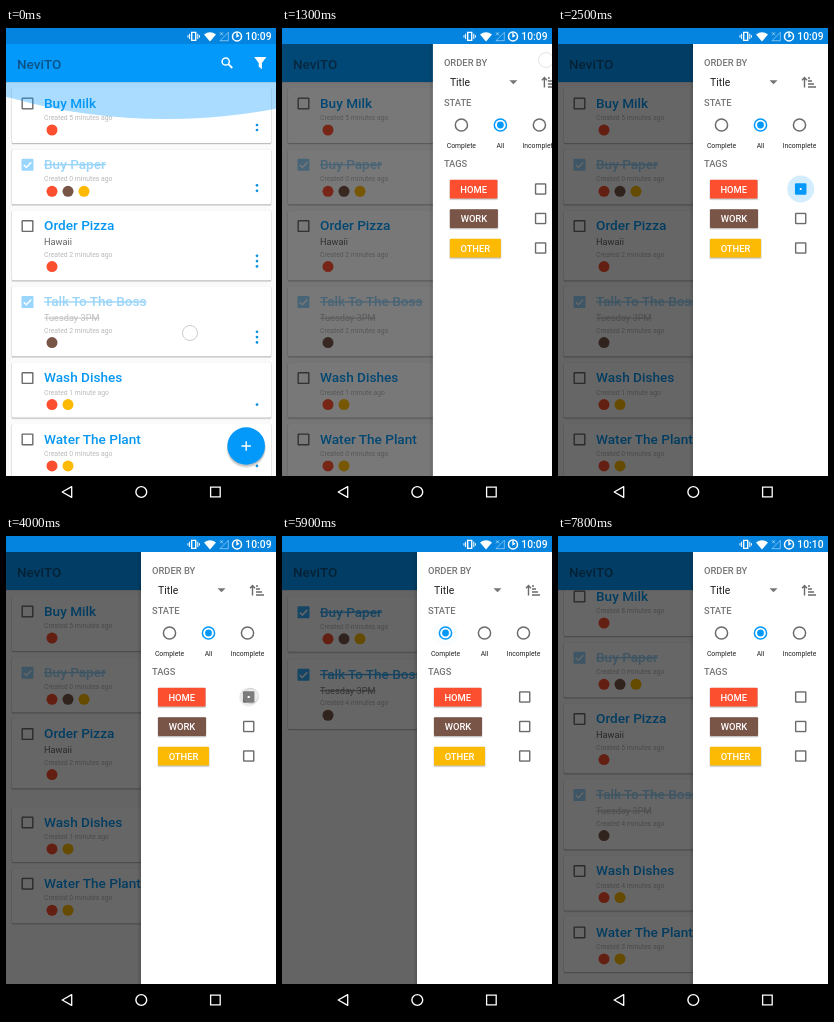
An HTML page that plays this animation: 270 px wide and 480 px high, repeating every 8 s.

```html
<!DOCTYPE html>
<html lang="en">
<head>
<meta charset="utf-8">
<title>To-do list with filter drawer</title>
<style>
html, body { margin: 0; width: 100%; height: 100%; overflow: hidden; background: #000; }
svg { display: block; width: 100vw; height: 100vh; font-family: Roboto, sans-serif; }
.m { font-weight: 500; }
.title { font-size: 13.6px; font-weight: 500; fill: #0597f2; }
.note { font-size: 9.2px; fill: #616161; }
.date { font-size: 6.8px; fill: #b9b9b9; }
.head { font-size: 9.4px; font-weight: 500; fill: #757575; }
.tag { font-size: 9.4px; font-weight: 500; fill: #fff; text-anchor: middle; }
.lab { font-size: 6.8px; fill: #212121; text-anchor: middle; }
</style>
</head>
<body>
<svg id="stage" viewBox="0 0 270 480" preserveAspectRatio="none"></svg>
<script>
const LOOP = 8000;
const BAR = 16, TOP = 54, FLOOR = 448;
const BLUE = '#0399fb', GREY = '#6b6b6b';
const TAG = { r: '#fb4f2f', b: '#795548', y: '#fdba04' };
const stage = document.getElementById('stage');

const clamp = v => Math.max(0, Math.min(1, v));
const span = (t, a, b) => clamp((t - a) / (b - a));
const ease = u => (1 - Math.cos(Math.PI * u)) / 2;

// eased value through [time, value] keys
function track(t, keys) {
  let v = keys[0][1];
  for (let i = 1; i < keys.length; i++) {
    const [a, from] = keys[i - 1], [b, to] = keys[i];
    if (t >= a) v = from + (to - from) * ease(span(t, a, b));
  }
  return v;
}

// held value: the last [time, value] already reached
const step = (t, keys) => keys.reduce((v, k) => t >= k[0] ? k[1] : v, keys[0][1]);

const cards = [
  { title: 'Buy Milk', tags: 'r', menu: [37, 42], mins: [[0, 5], [7150, 8]] },
  { title: 'Buy Paper', tags: 'rby', menu: [36, 41.5], done: true, mins: [[0, 0]] },
  { title: 'Order Pizza', note: 'Hawaii', tags: 'r', menu: [45.2, 50.5, 55.8], mins: [[0, 2], [7150, 5]] },
  { title: 'Talk To The Boss', note: 'Tuesday 3PM', tags: 'b', menu: [45.2, 50.5, 55.8], done: true, mins: [[0, 2], [3930, 4]] },
  { title: 'Wash Dishes', tags: 'ry', menu: [42], mins: [[0, 1], [7150, 4]] },
  { title: 'Water The Plant', tags: 'ry', menu: [42], mins: [[0, 0], [7150, 3]] }
];

const FIRST = 60, SMALL = 61.3, TALL = 76, END = 15;
let nextTop = FIRST;
cards.forEach((c, i) => {
  const y = nextTop, last = y - END;
  nextTop += c.note ? TALL : SMALL;
  if (c.done) {
    const short = i === 1 ? FIRST : FIRST + SMALL;
    c.y = [[0, y], [5670, y], [5920, short], [7150, short], [7400, last]];
    c.a = i === 3 ? [[0, 1], [3000, 1], [3100, 0], [4180, 0], [4300, 1]] : [[0, 1]];
  } else {
    c.y = i > 3 ? [[0, y], [3060, y], [3300, y - TALL], [3935, y - TALL], [4185, y]] : [[0, y]];
    c.y.push([7000, y], [7001, last]);
    c.a = [[0, 1], [5550, 1], [5670, 0], [7400, 0], [7520, 1]];
  }
});

const text = (x, y, cls, s, more = '') => `<text x="${x}" y="${y}" class="${cls}" ${more}>${s}</text>`;
const dot = (x, y, r, fill, more = '') => `<circle cx="${x}" cy="${y}" r="${r}" fill="${fill}" ${more}/>`;
const ring = (x, y, r, color, w) => dot(x, y, r, 'none', `stroke="${color}" stroke-width="${w}"`);
const rect = (x, y, w, h, fill, more = '') => `<rect x="${x}" y="${y}" width="${w}" height="${h}" fill="${fill}" ${more}/>`;
const path = (d, fill, stroke = 'none', w = 1, more = '') =>
  `<path d="${d}" fill="${fill}" stroke="${stroke}" stroke-width="${w}" ${more}/>`;

// a raised sheet: two soft offset edges under the face
const sheet = (x, y, w, h, fill, r = 1.5) =>
  rect(x - .6, y, w + 1.2, h + 1.6, '#000', `rx="${r}" opacity=".09"`) +
  rect(x - .2, y + .3, w + .4, h + .7, '#000', `rx="${r}" opacity=".16"`) +
  rect(x, y, w, h, fill, `rx="${r}"`);

// c runs from empty (0) through filled (.4) to ticked (1)
function checkbox(x, y, size, c, color) {
  const h = size / 2;
  const hole = (size - 2.8) * (1 - clamp(c / .4));
  let s = rect(x - h, y - h, size, size, color, 'rx="1.2"');
  if (hole > 0) s += rect(x - hole / 2, y - hole / 2, hole, hole, '#fff');
  const k = clamp((c - .4) / .6) * size / 12;
  if (k > 0) s += path('M-3.7 .2L-1.2 2.7L3.8 -2.5', 'none', '#fff', 1.5, `transform="translate(${x} ${y}) scale(${k})"`);
  return s;
}

function cardBody(c) {
  const low = c.note ? 14 : 0;
  const strike = c.done ? 'text-decoration="line-through"' : '';
  let s = sheet(6, 0, 259, c.note ? 69.7 : 55, '#fff');
  s += '<g class="fade">' + checkbox(21.5, 15.5, 12, c.done ? 1 : 0, c.done ? BLUE : GREY);
  s += text(38, 19.7, 'title', c.title, strike);
  if (c.note) s += text(38, 34.5, 'note', c.note, strike);
  s += '</g>' + text(38, 32 + low, 'date', '');
  [...c.tags].forEach((k, i) => s += dot(46 + 16 * i, 42 + low, 5.5, TAG[k]));
  c.menu.forEach(y => s += dot(251, y, 1.35, '#0b8fe0'));
  return s;
}

function drawerBody() {
  let s = rect(-4, BAR, 4, FLOOR - BAR, 'url(#edge)') + rect(0, BAR, 136, FLOOR - BAR, '#fff');
  s += text(11, 37.7, 'head', 'ORDER BY') + text(11, 77.7, 'head', 'STATE') + text(11, 138.5, 'head', 'TAGS');
  s += text(17, 58.2, '', 'Title', 'font-size="10.4" fill="#212121"');
  s += path('M76.5 52.2h8l-4 4z', '#757575');
  s += path('M111.5 59.5V50M109 52.3L111.5 49.6L114 52.3', 'none', GREY, 1.4);
  s += path('M115 50h2M115 53h4M115 56h6M115 59h8', 'none', GREY, 1.3);
  s += '<g id="ripple"></g><g id="radios"></g><g id="home"></g>';
  ['Complete', 'All', 'Incomplete'].forEach((l, i) => s += text(28.5 + 39 * i, 120.4, 'lab', l));
  [['HOME', 'r', 47.5], ['WORK', 'b', 48], ['OTHER', 'y', 51]].forEach(([l, k, w], i) => {
    const y = 151.8 + 29.5 * i;
    s += sheet(17, y, w, 18.8, TAG[k], 1) + text(17 + w / 2, y + 12.9, 'tag', l);
    if (i) s += checkbox(107.7, y + 9.2, 11.5, 0, GREY);
  });
  return s;
}

function statusBar() {
  let s = rect(0, 0, 270, BAR, '#0484df');
  s += path('M185.7 4.4h4v8h-4z', 'none', '#fff', 1.4);
  s += path('M183.6 5.7v5.4M182 7.2v2.4M191.8 5.7v5.4M193.4 7.2v2.4', 'none', '#fff', 1);
  s += path('M198 6.4Q204 2.2 210 6.4L204 13.4z', '#fff');
  s += path('M222.3 4.3V12.7H214z', 'none', '#fff', .9, 'opacity=".5"');
  s += path('M214 4.3l3 3M217 4.3l-3 3', 'none', '#fff', .8, 'opacity=".7"');
  s += ring(231, 8.4, 4.5, '#fff', 1.5) + path('M231 5V8.6L233 7.4', 'none', '#fff', 1.4);
  return s + text(265.5, 12.4, 'm', '10:09', 'id="clock" font-size="10.3" fill="#fff" text-anchor="end"');
}

function toolbar() {
  let s = rect(0, TOP, 270, 1, '#000', 'opacity=".08"') + rect(0, BAR, 270, TOP - BAR, BLUE);
  s += text(11, 40.8, 'm', 'NeviTO', 'font-size="13.5" fill="#0b5387"');
  s += ring(219.7, 33.5, 3.6, '#fff', 1.5) + path('M222.4 36.2L226.3 40', 'none', '#fff', 1.8);
  return s + path('M248.2 29h12.2l-4.5 6v6.2l-3.2-2.6V35z', '#fff');
}

function fab() {
  return dot(240.2, 420.4, 19.6, '#000', 'opacity=".1"') + dot(240.2, 419.4, 19.1, '#000', 'opacity=".15"') +
    dot(240.2, 418, 18.8, BLUE) + path('M235.5 418h9.4M240.2 413.3v9.4', 'none', '#fff', 1.4);
}

function navBar() {
  return rect(0, FLOOR, 270, 480 - FLOOR, '#000') +
    path('M65.7 458.6V469.4L56.2 464z', 'none', '#fff', 1.3, 'stroke-linejoin="round"') +
    ring(135.3, 464, 5.4, '#fff', 1.4) + path('M204.6 459.2h9.6v9.6h-9.6z', 'none', '#fff', 1.3);
}

stage.innerHTML = `<defs>
  <clipPath id="list">${rect(0, TOP, 270, FLOOR - TOP, '#000')}</clipPath>
  <linearGradient id="edge"><stop offset="0" stop-opacity="0"/><stop offset="1" stop-opacity=".15"/></linearGradient>
  </defs>` + rect(0, 0, 270, 480, '#fafafa') +
  `<g clip-path="url(#list)">${cards.map(c => `<g class="card">${cardBody(c)}</g>`).join('')}
  <ellipse id="glow" cx="160" rx="405" fill="${BLUE}"/></g>` + toolbar() + fab() +
  rect(0, BAR, 270, FLOOR - BAR, '#000', 'id="scrim"') +
  `<g id="drawer">${drawerBody()}</g>` + statusBar() + navBar() +
  '<circle id="touch" r="7.5" fill="#fff" fill-opacity=".15" stroke="#9e9e9e" stroke-opacity=".65" stroke-width=".8"/>';

const $ = id => document.getElementById(id);
const set = (el, props) => { for (const k in props) el.setAttribute(k, props[k]); };
document.querySelectorAll('.card').forEach((el, i) => {
  cards[i].el = el;
  cards[i].fade = el.querySelector('.fade');
  cards[i].date = el.querySelector('.date');
});

// x, y, press, release
const touches = [
  [184, 305, -100, 180], [264, 32, 980, 1350], [243, 161, 2200, 2430],
  [245, 160, 3780, 4070], [172, 101, 5150, 5480], [203, 104, 6850, 7120]
];
// x, y, start, radius, colour, strength (drawer coordinates)
const ripples = [
  [107.7, 161, 2350, 13.5, BLUE, .18], [107.7, 161, 3850, 9.5, '#000', .08],
  [28.5, 97, 5340, 13, BLUE, .18], [67.5, 97, 7010, 13, BLUE, .18]
];

function drawTouch(t) {
  const p = touches.find(q => t >= q[2] && t < q[3]);
  set($('touch'), p
    ? { cx: p[0], cy: p[1], opacity: Math.min(span(t, p[2], p[2] + 50), 1 - span(t, p[3] - 90, p[3])) }
    : { opacity: 0 });
}

function drawRipples(t) {
  $('ripple').innerHTML = ripples.filter(r => t > r[2] && t < r[2] + 600).map(([x, y, at, r, color, a]) =>
    dot(x, y, 3 + (r - 3) * ease(span(t, at, at + 150)), color,
      `opacity="${a * (1 - span(t, at + 250, at + 600))}"`)).join('');
}

function drawControls(t) {
  const complete = track(t, [[0, 0], [5360, 0], [5510, 1], [7020, 1], [7160, 0]]);
  $('radios').innerHTML = [complete, 1 - complete, 0].map((v, i) => {
    const x = 28.5 + 39 * i, color = v > .5 ? BLUE : GREY;
    return ring(x, 97, 6.1, color, 1.5) + (v > 0 ? dot(x, 97, 3.4 * v, color) : '');
  }).join('');
  const on = t >= 2350 && t < 3850;
  const c = t < 3850 ? span(t, 2350, 2830) : 1 - span(t, 3850, 4067);
  $('home').innerHTML = checkbox(107.7, 161, 11.5, c, on ? BLUE : GREY);
}

function render(t) {
  const doneAlpha = track(t, [[0, .4], [5550, .4], [5900, .8], [7150, .8], [7400, .4]]);
  for (const c of cards) {
    const n = step(t, c.mins);
    set(c.el, { transform: `translate(0 ${track(t, c.y)})`, opacity: track(t, c.a) });
    if (c.done) set(c.fade, { opacity: doneAlpha });
    c.date.textContent = `Created ${n} minute${n === 1 ? '' : 's'} ago`;
  }

  // a flattened circle bulging below the toolbar
  const pull = 1 - ease(span(t, 100, 600)), ry = 275 * pull;
  set($('glow'), { cy: TOP + 37 * pull - ry, ry, opacity: .34 * pull });

  const open = 1 - Math.pow(1 - span(t, 1120, 1640), 5);
  set($('scrim'), { opacity: .6 * open });
  set($('drawer'), { transform: `translate(${270 - 135 * open} 0)`, visibility: open > 0 ? 'visible' : 'hidden' });

  drawControls(t);
  drawRipples(t);
  drawTouch(t);
  $('clock').textContent = t < 7800 ? '10:09' : '10:10';
}

const begin = performance.now();
function tick() {
  render((performance.now() - begin) % LOOP);
  requestAnimationFrame(tick);
}
tick();
</script>
</body>
</html>
```
